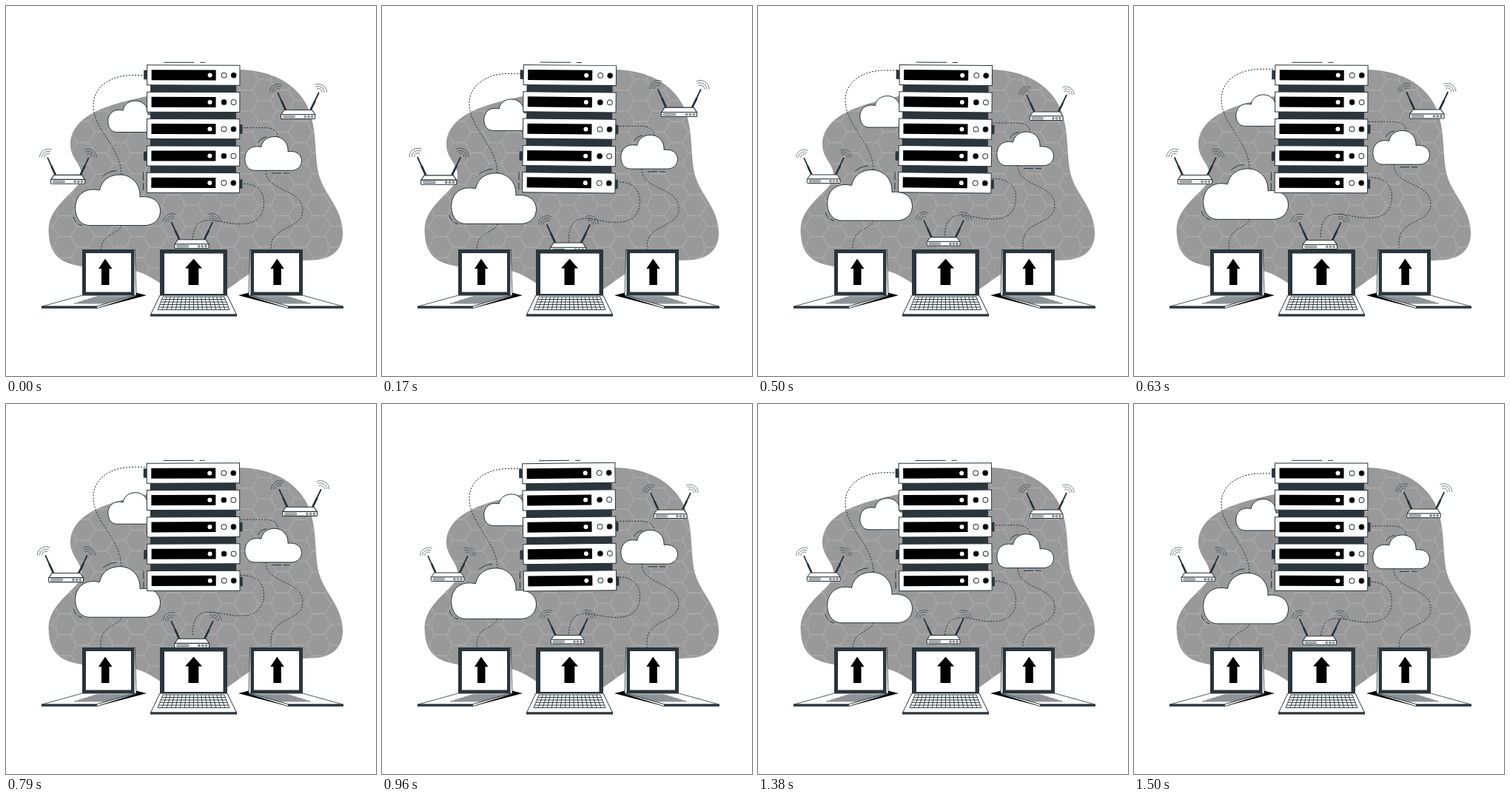
Animation of 500 by 500 pixels, one loop 1.54 s. Source, as an HTML page:

```html
<!DOCTYPE html>
<html lang="en">
<head>
<meta charset="utf-8">
<style>
  html, body { margin: 0; height: 100%; overflow: hidden; background: #fff; }
  svg { display: block; width: 100vw; height: 100vh; }
  .line { fill: none; stroke: #263238; }
  .face { fill: #fff; stroke: #263238; }
  .dash { stroke-dasharray: 2.2 1.8; }
  .dark { fill: #2b353b; }
</style>
</head>
<body>
<svg viewBox="0 0 500 500">
  <defs>
    <pattern id="hex" width="49" height="28.3" patternUnits="userSpaceOnUse" x="79.500" y="127.800">
      <path d="M0 14.15H8.2L16.3 0H32.7L40.8 14.15H49M8.2 14.15L16.3 28.3H32.7L40.8 14.15" fill="none" stroke="#c4c4c4" stroke-width=".6"/>
    </pattern>
    <path id="blob" d="M190 122C150 131 88 143 87 187C87 207 104 214 102 232C99 250 58 268 57.500 302C58 334 70 347 103 352C130 357 152 353 175 358C205 366 225 394 262 396C295 395 318 363 350 351C372 343.500 400 344.500 420 343C447 340 456 323 455 304C453 270 429 255 422 225C416 192 421 163 406 133C389 102 356 87 316 86C270 84 235 113 190 122Z"/>
    <path id="cloud" d="M113 296.5C96 296.5 91 277 95 264C100 249 114 246 126.500 249C129 236 139 228 154 228C170 228 182 241 181 258C196 256 209 263 208.500 278C208 290 198 296.500 188 296.500Z" class="face" vector-effect="non-scaling-stroke"/>
    <g id="router">
      <path d="M62 205L72 227M116 205L105.500 227" class="line" stroke-width="1.8"/>
      <path d="M67 216L72.500 228M111 216L105 228" class="line" stroke-width="2.6"/>
      <path d="M70.500 228H107L111 234H66.500Z" class="face"/>
      <rect x="66.300" y="233.800" width="44.700" height="5.700" rx="1" class="face"/>
      <rect x="69" y="235.700" width="15.500" height="2" rx="1" class="line" stroke-width=".8"/>
      <g class="line" stroke-width=".9">
        <circle cx="98" cy="236.700" r="1.200"/><circle cx="102.500" cy="236.700" r="1.200"/><circle cx="107" cy="236.700" r="1.200"/>
      </g>
      <g id="waves" class="line" stroke-width=".6">
        <path d="M51.700 205A11 11 0 0 1 67.700 195.200M54.700 205A8 8 0 0 1 66.300 197.900M57.700 205A5 5 0 0 1 65 200.600"/>
      </g>
      <use href="#waves" transform="translate(178) scale(-1 1)"/>
    </g>
    <g id="laptop">
      <path d="M174 387L190 391L123 408.500Z"/>
      <path d="M103 391H174L122 406H48.500Z" class="face" stroke-width=".8"/>
      <path id="sideKeys" class="line" stroke-width=".4"/>
      <path d="M122 406L174 391L176 391.500L123 408.500Z" class="face" stroke-width=".8"/>
      <path d="M48 405.500H122.500L123 408.800H48Z" class="dark"/>
      <path d="M172 329.300H174.300L176 391H172Z" class="face" stroke-width=".8"/>
      <rect x="103" y="329" width="70.500" height="62" class="dark"/>
      <rect x="108" y="334" width="61" height="52.500" fill="#fff"/>
    </g>
    <path id="arrow" d="M134 341.500L143.500 355H139.500V377H129V355H125Z"/>
  </defs>

  <use href="#blob" fill="#999"/>
  <use href="#blob" fill="url(#hex)"/>

  <g id="floating">
    <g class="line dash">
      <path d="M188 93.500H170C140 94 118 110 118 134C118 168 155 190 156 228"/>
      <path d="M156 296C154 309 128 306 128 332V348"/>
      <path d="M317 164.500H348C362 164.500 368 168 368 182"/>
      <path d="M351 222C351 252 401 246 401 276C401 303 358 295 358 328V348"/>
      <path d="M317 240C336 239 348.500 248 348.500 266C348.500 285 337 294 319 294.500C300 295 292 290 275 289.500C259 289 252 299 252 322"/>
    </g>
    <use href="#cloud" transform="translate(79.700 -13.300) scale(.62)"/>
    <use href="#cloud" transform="translate(260.200 24.200) scale(.668)"/>
    <use href="#cloud"/>
    <path class="line" d="M131 230C136 225.500 142 223 149 222.500M91 285C92 289 93.500 291 95.500 292.800M97.500 294.500L103 297M340.500 185C343 180 347 178 352 177M359 226H372M375 226H383"/>
  </g>

  <g id="rack">
    <path class="line" d="M213 76.300H254M262 76.300H269M185.700 225V236M185.700 239.500V249"/>
    <path class="dark" d="M195 95H311V235H195ZM186 87H191V99.500H186ZM186 197H191V209.500H186ZM315 160H319.500V172.500H315ZM315 234H319.500V246.500H315Z"/>
  </g>

  <g id="routers">
    <use href="#router"/>
    <use href="#router" x="301" y="-85"/>
    <use href="#router" x="162" y="84.500"/>
  </g>

  <use href="#laptop"/>
  <use href="#laptop" transform="translate(504) scale(-1 1)"/>
  <path d="M208 391H299L311.500 417H195.500Z" class="face"/>
  <path id="frontKeys" class="line" stroke-width=".9"/>
  <path d="M195 416.500H312V419.500H195Z" class="dark"/>
  <rect x="208" y="329" width="91" height="62" class="dark"/>
  <rect x="214" y="334.500" width="79.500" height="54.500" fill="#fff"/>
  <use href="#arrow"/>
  <use href="#arrow" x="232.300"/>
  <path d="M253.500 341.500L265 354.500H260.300V377H246.500V354.500H242Z"/>
</svg>
<script>
const $ = id => document.getElementById(id);
const lerp = (a, b, k) => a + (b - a) * k;

// Grid over a trapezoid: top edge x0..x1 at y0, bottom edge x2..x3 at y1.
function keys(x0, x1, y0, x2, x3, y1, cols, rows) {
  let d = '';
  for (let c = 0; c <= cols; c++)
    d += `M${lerp(x0, x1, c / cols)} ${y0}L${lerp(x2, x3, c / cols)} ${y1}`;
  for (let r = 0; r <= rows; r++) {
    const k = r / rows, y = lerp(y0, y1, k);
    d += `M${lerp(x0, x2, k)} ${y}H${lerp(x1, x3, k)}`;
  }
  return d;
}
$('frontKeys').setAttribute('d', keys(212, 295, 393, 205, 302, 410.5, 16, 5));
$('sideKeys').setAttribute('d', keys(123, 168, 392.5, 92, 134, 402, 14, 5));

let units = '';
for (let i = 0; i < 5; i++) {
  const light = (x, on) => `<circle cx="${x}" cy="13.5" r="3.4" class="face" style="${on ? 'fill:#000' : ''}"/>`;
  units += `<g transform="translate(0 ${80 + i * 36.35})">
    <rect x="190.500" width="125.300" height="27" class="face"/>
    <rect x="196.500" y="6.500" width="87" height="14"/>
    <circle cx="275.500" cy="13.500" r="3" fill="#fff"/>
    ${light(294.5, i % 2)}${light(307.5, i % 2 === 0)}</g>`;
}
$('rack').insertAdjacentHTML('beforeend', units);

// Piecewise linear keyframes: [progress, value] pairs.
function track(stops, p) {
  const i = stops.findIndex(s => s[0] > p);
  const [a, b] = [stops[i - 1], stops[i]];
  return lerp(a[1], b[1], (p - a[0]) / (b[0] - a[0]));
}
const FLOAT = [[0, .67], [.5, -9.33], [1, .67]];
const SWAY = [[0, 0], [.25, 1], [.75, -1], [1, 0]];
const BEAT = [[0, 1], [.1, 1.1], [.3, 1], [.4, 1], [.5, 1.1], [.6, 1], [1, 1]];

const LOOP = 1540, STEPS = 37;
function draw(now) {
  const step = Math.floor(now % LOOP / LOOP * STEPS + .1) % STEPS;
  const p = (50 + step * 40.8) / 1500 % 1;
  $('floating').setAttribute('transform', `translate(0 ${track(FLOAT, p)})`);
  $('rack').setAttribute('transform', `rotate(${track(SWAY, p)} 253 164.5)`);
  $('routers').setAttribute('transform', `translate(240 217) scale(${track(BEAT, p)}) translate(-240 -217)`);
}

const start = performance.now();
function tick() {
  draw(performance.now() - start);
  requestAnimationFrame(tick);
}
tick();
</script>
</body>
</html>
```
